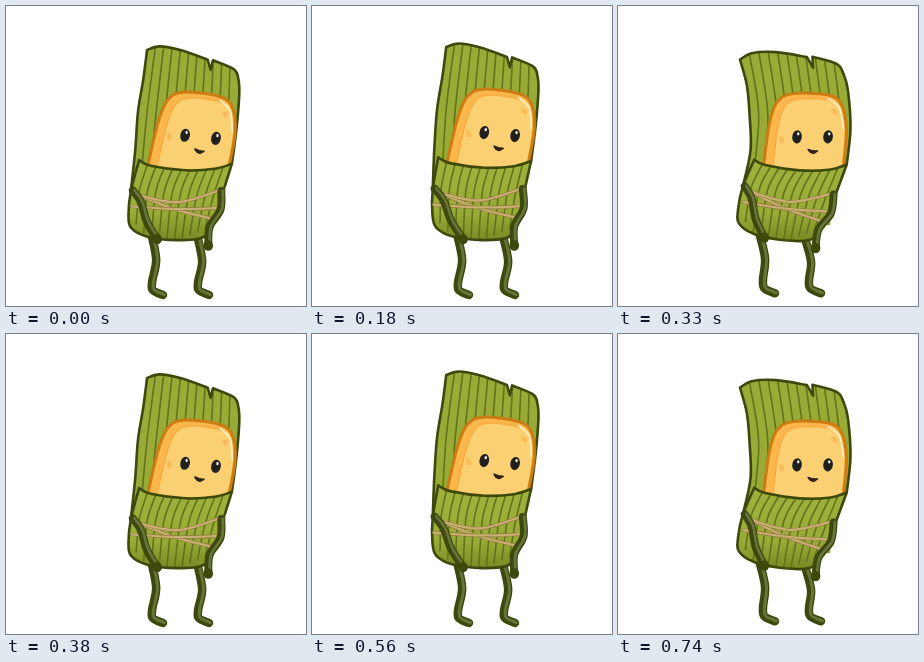
An HTML page with a canvas for the animation above (0.76 s loop, 300x300 px).

```html
<!DOCTYPE html>
<html lang="en">
<head>
<meta charset="utf-8">
<title>Dancing tamale</title>
<style>
  html, body { margin: 0; width: 100%; height: 100%; overflow: hidden; background: #fff; }
  canvas { display: block; width: 100vw; height: 100vh; }
</style>
</head>
<body>
<canvas id="stage" width="300" height="300"></canvas>
<script>
const ctx = document.getElementById("stage").getContext("2d");
const ink = "#3d490c", leafGreen = "#98ab37", stripeGreen = "#61731a";

// One upright body; the dance bends and sways its points.
const leafTop = [[149, 37], [162, 35], [182, 42], [206, 54]];
const notch = [207, 64];
const leafFlap = [[211, 55], [230, 65], [233, 74], [232, 88], [226, 122], [221, 156]];
const leafLeft = [[123, 187], [124, 143], [129, 103], [139, 68], [149, 37]];
const wrapTop = [[128, 153], [140, 159], [175, 163], [204, 161], [221, 156]];
const wrapSide = [[221, 156], [214, 187], [208, 217], [199, 230], [174, 234], [144, 232], [127, 224], [123, 211], [123, 187], [128, 153]];
const loaf = [[-50, 38], [-48, 20], [-43, -14], [-36, -34], [-21, -43], [15, -42], [29, -32], [34, -6], [30, 38]];
const leftArm = [[125, 186], [134, 197], [142, 217], [154, 234]];
const rightArm = [[213, 182], [214, 201], [205, 219], [205, 238]];
const leg = [[148, 230], [152, 255], [147, 276], [147, 285], [157, 290]];
// Left drop, right drop and sag of each rope
const ropes = [[1, 24, 3], [2, -7, 11], [15, 12, 2]];

const beats = 7;
const beatLength = n => n % 5 === 2 ? 80 : 50;
const loop = 760;

const clamp = v => Math.min(1, Math.max(0, v));
const lerp = (a, b, t) => a + (b - a) * t;
const between = (p, q, t) => [lerp(p[0], q[0], t), lerp(p[1], q[1], t)];
const shift = (pts, dx, dy) => pts.map(([x, y]) => [x + dx, y + dy]);
const last = pts => pts[pts.length - 1];

function poseAt(time) {
  let beat = 0;
  for (let t = time % loop; t >= beatLength(beat); beat++) t -= beatLength(beat);
  const wave = peak => Math.cos(2 * Math.PI * (beat - peak) / beats);
  const lean = (1 - wave(1.5)) / 2;
  return { bend: lean * lean * (3 - 2 * lean), sway: wave(6.5) };
}

// The top curls left, the belly pushes right and the hips swing left; feet stay.
function bender({ bend, sway }) {
  return pts => pts.map(([x, y]) => {
    const curl = Math.max(0, (150 - y) / 114) ** 2;
    const hang = Math.max(0, (y - 150) / 64);
    const legFade = clamp((280 - y) / 45);
    const dx = Math.max(6 - 40 * curl - 11 * hang, (y - 290) / 6.4 - (y < 150 ? 99 : 0));
    const dy = -0.42 * curl * (x - 190)
      + 0.15 * clamp(hang * 2) * legFade * (x - 172) - 3 * (1 - legFade);
    const loose = clamp((235 - y) / 80);
    return [x + dx * bend + 3.6 * sway * loose, y + dy * bend + 1.5 * sway * loose];
  });
}

// Joins smooth runs of points; corners appear where runs meet.
function outline(...runs) {
  const path = new Path2D();
  path.moveTo(...runs[0][0]);
  for (const run of runs) {
    path.lineTo(...run[0]);
    for (let i = 0; i < run.length - 1; i++) {
      const a = run[i - 1] || run[i], b = run[i], c = run[i + 1], d = run[i + 2] || c;
      path.bezierCurveTo(
        b[0] + (c[0] - a[0]) / 6, b[1] + (c[1] - a[1]) / 6,
        c[0] - (d[0] - b[0]) / 6, c[1] - (d[1] - b[1]) / 6, c[0], c[1]);
    }
  }
  return path;
}

function stroke(path, color, width) {
  ctx.strokeStyle = color;
  ctx.lineWidth = width;
  ctx.stroke(path);
}

function fill(path, color) {
  ctx.fillStyle = color;
  ctx.fill(path);
}

function ellipse(x, y, rx, ry, color, turn = 0) {
  const path = new Path2D();
  path.ellipse(x, y, rx, ry, turn, 0, Math.PI * 2);
  fill(path, color);
}

// Point at share t of the horizontal extent of a line of points.
function along(pts, t) {
  const x = lerp(pts[0][0], last(pts)[0], t);
  let i = 0;
  while (i < pts.length - 2 && pts[i + 1][0] < x) i++;
  const [a, b] = [pts[i], pts[i + 1]];
  return between(a, b, (x - a[0]) / (b[0] - a[0]));
}

function stripes(shape, top, left, right, bottom) {
  const count = 11;
  ctx.save();
  ctx.clip(shape);
  for (let i = 1; i < count; i++) {
    const t = i / count;
    stroke(outline([along(top, t), between(left, right, t), along(bottom, t)]), stripeGreen, 1.6);
  }
  ctx.restore();
}

function limb(pts, width) {
  stroke(outline(pts), ink, width);
  stroke(outline(shift(pts, 1.4, -0.4)), "#66733a", width * 0.35);
}

function drawLeaf(place) {
  const top = place(leafTop), flap = place(leafFlap), left = place(leafLeft);
  const shape = outline(top, place([notch]), flap, left);
  fill(shape, leafGreen);
  stripes(shape, [...top, ...flap.slice(0, 3)], left[2], flap[4], [left[0], last(flap)]);
  stroke(shape, ink, 2.6);
}

function drawFace({ bend, sway }) {
  ctx.save();
  ctx.translate(191.3 + 3.6 * sway, 129.5 + 1.5 * sway);
  ctx.rotate((9 - 10 * bend) * Math.PI / 180);
  const crust = outline(loaf);
  const inner = outline(loaf.map(([x, y]) => [x * 0.87 + 3, y * 0.92 + 2]));
  fill(crust, "#fbb64c");
  fill(inner, "#fad073");
  stroke(inner, "#f6ab3e", 1.4);
  stroke(crust, "#cb7c12", 3);
  stroke(outline([[16, -38], [27, -29], [31, -8]]), "#fff0c4", 1.8);
  ellipse(-31, 3, 2.5, 4, "#f8bb59", -0.3);
  ellipse(22, -25, 3.5, 2.2, "#f8bb59", 0.7);
  for (const eye of [-15.5, 15.5]) {
    ellipse(eye, 0, 4.8, 6.6, "#20211f", 0.12);
    ellipse(eye + 1.2, -3, 1.2, 1.7, "#f7f3e9");
  }
  const mouth = outline([[-4.5, 12.5], [-2.5, 15.2], [1, 16.5], [5, 14]], [[5, 14], [0, 13.8], [-4.5, 12.5]]);
  fill(mouth, "#3a2418");
  stroke(mouth, "#2a2019", 1.4);
  ctx.restore();
}

function drawWrap(place) {
  const top = place(wrapTop), side = place(wrapSide);
  const shape = outline(top, side);
  const shade = ctx.createLinearGradient(0, 150, 0, 238);
  shade.addColorStop(0, "#9fb23d");
  shade.addColorStop(0.65, leafGreen);
  shade.addColorStop(1, "#748620");
  fill(shape, shade);
  const [right, left] = [side[1], side[8]];
  stripes(shape, top, left, right, [side[7], side[5], side[4], side[2]]);
  stroke(shape, ink, 2.6);
  for (const [dropL, dropR, sag] of ropes) {
    const [a] = shift([left], 1, dropL), [b] = shift([right], -dropR / 5, dropR);
    const [mid] = shift([between(a, b, 0.5)], 0, sag);
    const rope = outline([a, mid, b]);
    stroke(rope, "#8f7a3c", 3.4);
    stroke(rope, "#cbae73", 2.2);
  }
}

function drawArm(pts) {
  const [x, y] = last(pts);
  limb(pts, 8);
  ellipse(x, y, 4.8, 5.2, ink);
}

function draw(pose) {
  const place = bender(pose);
  ctx.fillStyle = "#fff";
  ctx.fillRect(0, 0, 300, 300);
  for (const dx of [0, 46]) limb(place(shift(leg, dx, 0)), 8.5);
  drawLeaf(place);
  drawFace(pose);
  drawWrap(place);
  drawArm(place(leftArm));
  drawArm(place(rightArm));
}

ctx.lineCap = ctx.lineJoin = "round";
const start = performance.now();
function tick() {
  draw(poseAt(performance.now() - start));
  requestAnimationFrame(tick);
}
tick();
</script>
</body>
</html>
```
